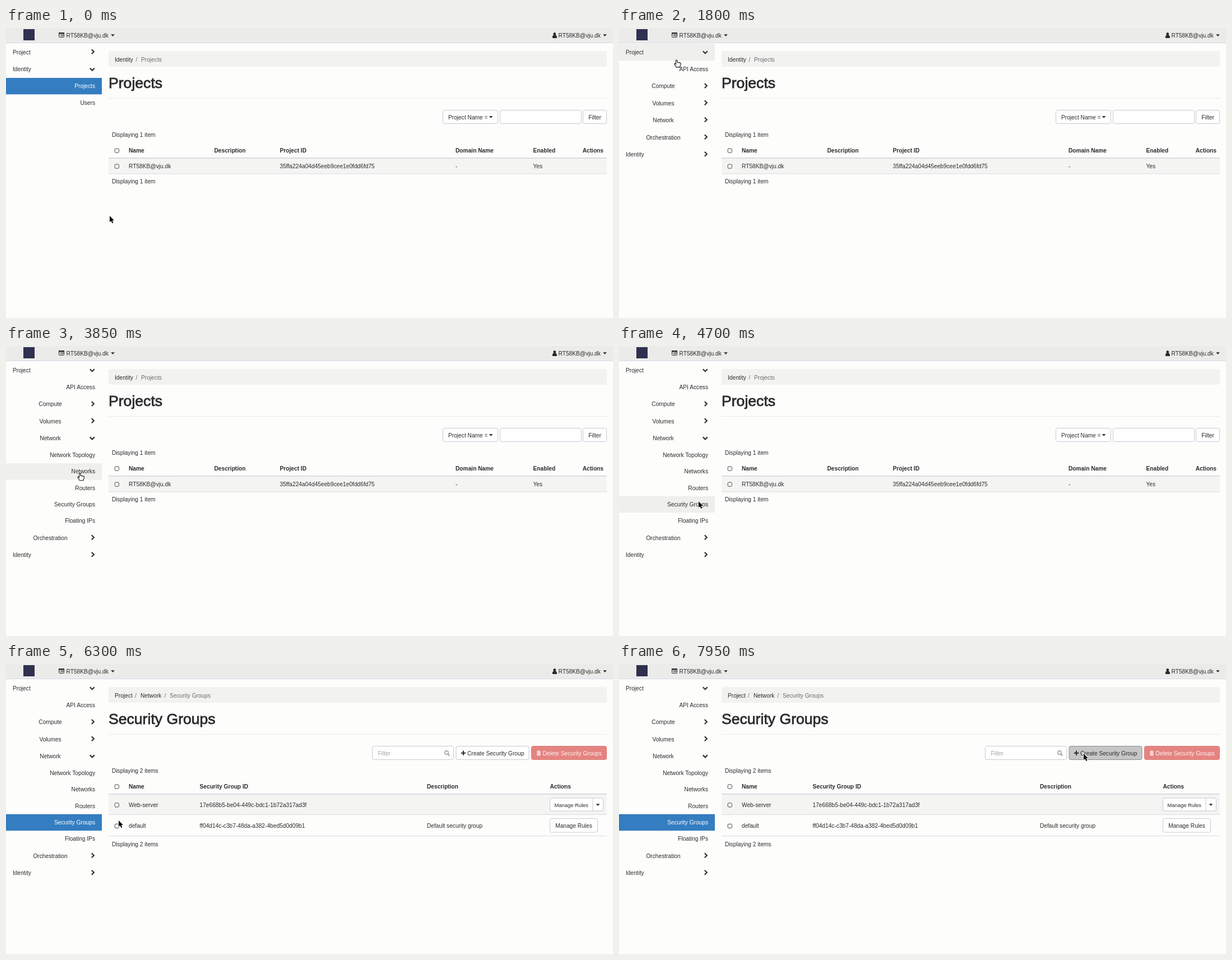
These frames come from a looping animation (1083 px wide and 517 px high, 8000 ms). An HTML page:

```html
<!DOCTYPE html>
<html lang="en">
<head>
<meta charset="utf-8">
<title>Security groups</title>
<style>
  html, body { margin: 0; width: 100%; height: 100%; overflow: hidden; background: #fdfdfc; }
  #stage { display: block; width: 1083px; height: 517px; }
  text { font: 10.2px "Liberation Sans", Arial, sans-serif; fill: #2b2b2b; white-space: pre; }
  .bold { font-weight: bold; }
  .title { font-size: 26.6px; stroke: #2b2b2b; stroke-width: .8px; }
  .loading { font-size: 13.8px; stroke: #2b2b2b; stroke-width: .5px; }
  .small { font-size: 9.4px; }
  .muted { fill: #6c6c6c; }
  .hint { fill: #a5a5a5; }
  .light { fill: #fdf3f3; }
</style>
</head>
<body>
<svg id="stage" viewBox="0 0 1083 517"></svg>
<script>
const LOOP = 8000, STEP = 50;
const OPEN_PROJECT = 1150, OPEN_NETWORK = 2600, CLICK_LINK = 4550;
const LOADING = 4900, NEW_PAGE = 5750, PRESS = 7850;
const SIDE = 171, ROW = 30.3, LINK = 29.4, ACCOUNT = 'RT58KB@vju.dk';
const INK = '#2b2b2b', BLUE = '#347dc0', BORDER = '#c9c8d3', STRIPE = '#f4f4f3';
const stage = document.getElementById('stage');

function add(parent, tag, attrs = {}) {
  const node = document.createElementNS('http://www.w3.org/2000/svg', tag);
  set(node, attrs);
  parent.append(node);
  return node;
}
function set(node, attrs) {
  for (const key in attrs) node.setAttribute(key, attrs[key]);
}
const group = parent => add(parent, 'g');
const show = (node, on) => set(node, { display: on ? 'inline' : 'none' });
const rect = (parent, x, y, width, height, fill, more = {}) =>
  add(parent, 'rect', { x, y, width, height, fill, ...more });
const path = (parent, d, more = {}) => add(parent, 'path', { d, fill: INK, ...more });

// Text is placed by the vertical middle of its capitals.
function label(parent, x, middle, content, cls = '', anchor = 'start', drop = 3.7) {
  const node = add(parent, 'text', { x, y: middle + drop, class: cls, 'text-anchor': anchor });
  node.textContent = content;
}
const box = (parent, x, y, w, h, fill = '#fff', stroke = BORDER) =>
  rect(parent, x + .5, y + .5, w - 1, h - 1, fill, { rx: 3, stroke });
const caret = (parent, x, y) => path(parent, `M${x} ${y}h6.6l-3.3 3.7z`);
const checkbox = (parent, y) =>
  rect(parent, 194.2, y - 3.5, 7.2, 7.2, '#fff', { rx: 1.8, stroke: '#444', 'stroke-width': 1 });
const rule = (parent, y, color = '#dddde2', h = 1) => rect(parent, 183, y, 889, h, color);

function chevron(parent, y) {
  const style = { fill: 'none', stroke: '#333', 'stroke-width': 2.2 };
  const right = path(parent, `M152.8 ${y - 4.7}l4 4l-4 4`, style);
  const down = path(parent, `M149.8 ${y - 1.8}l4 4l4 -4`, style);
  return open => { show(right, !open); show(down, open); };
}

function buildNavbar() {
  rect(stage, 0, 0, 1083, 26, '#ebebea');
  rect(stage, 0, 26, 1083, 1, '#d8d7e6');
  rect(stage, 31, 2, 20, 20, '#30304f');
  rect(stage, 94.5, 8.5, 9, 8, 'none', { rx: 1, stroke: INK });
  path(stage, 'M94 8h10v2.4h-10zM96 11.4h1.2v1h-1.2zM98 11.4h4.5v1H98zM96 13.6h1.2v1h-1.2zM98 13.6h4.5v1H98z');
  label(stage, 107.5, 13, ACCOUNT);
  caret(stage, 187.2, 11.2);
  path(stage, 'M978.8 8a2.5 2.8 0 0 1 1.5 5c2 .2 2.7 1.5 2.7 3.4q0 1.6-1.5 1.6h-5.2q-1.5 0-1.5-1.6c0-1.9.7-3.2 2.5-3.4a2.5 2.8 0 0 1 1.5-5z');
  label(stage, 985.5, 13, ACCOUNT);
  caret(stage, 1065.2, 11.2);
}

const rows = [];
function addRow(panel, middle, name, kind, height = ROW) {
  const holder = group(panel);
  const bg = rect(holder, 0, middle - height / 2, SIDE, height, '#efefed');
  const [x, anchor] = { top: [12, 'start'], mid: [79, 'middle'], leaf: [159, 'end'] }[kind];
  label(holder, x, middle, name, '', anchor);
  const row = { panel, holder, bg, middle, height, shift: 0, text: holder.lastChild };
  if (kind !== 'leaf') row.toggle = chevron(holder, middle);
  rows.push(row);
  return row;
}
const addPanel = parent => add(parent, 'svg', { x: 0, y: 0, width: SIDE, height: 0 });

function buildSidebar() {
  const root = addPanel(stage);
  set(root, { height: 517 });
  root.top = 0;
  root.size = 517;
  const projectPanel = addPanel(root), identityPanel = addPanel(root);
  const project = addRow(root, 43, 'Project', 'top');
  const identity = addRow(root, 73.4, 'Identity', 'top');

  addRow(projectPanel, 15.4, 'API Access', 'leaf');
  addRow(projectPanel, 45.7, 'Compute', 'mid').toggle(false);
  addRow(projectPanel, 75.9, 'Volumes', 'mid').toggle(false);
  const network = addRow(projectPanel, 106.2, 'Network', 'mid');
  const orchestration = addRow(projectPanel, 136.9, 'Orchestration', 'mid');
  orchestration.toggle(false);
  const networkPanel = addPanel(projectPanel);
  const links = ['Network Topology', 'Networks', 'Routers', 'Security Groups', 'Floating IPs']
    .map((name, i) => addRow(networkPanel, 14.8 + i * 29.3, name, 'leaf', LINK));
  const projects = addRow(identityPanel, 15, 'Projects', 'leaf', LINK);
  addRow(identityPanel, 44.5, 'Users', 'leaf', LINK);
  return { project, identity, network, orchestration, projects, security: links[3],
    projectPanel, identityPanel, networkPanel };
}

function place(panel, top, size, parentTop = 0) {
  panel.top = top;
  panel.size = size;
  set(panel, { y: top - parentTop, height: Math.max(size, .01) });
}
function shiftRow(row, by) {
  row.shift = by;
  set(row.holder, { transform: `translate(0 ${by})` });
}
function paintRow(row, active, hovered) {
  set(row.bg, { fill: active ? BLUE : '#efefed' });
  show(row.bg, active || hovered);
  row.text.style.fill = active ? '#fff' : INK;
}

function pageHeader(page, crumbs, title) {
  rect(page, 183, 41, 889, 28, '#f2f2f1', { rx: 3 });
  crumbs.forEach(([x, name], i) =>
    label(page, x, 56.3, name, name === '/' || i === crumbs.length - 1 ? 'muted' : ''));
  label(page, 183, 98.5, title, 'title', 'start', 8.5);
  rule(page, 125, '#e9e9ec');
}
function tableHeader(page, columns) {
  checkbox(page, 218.5);
  columns.forEach(([x, name, anchor]) => label(page, x, 218, name, 'bold', anchor));
}

function buildProjects() {
  const page = group(stage);
  pageHeader(page, [[194, 'Identity'], [231.5, '/'], [241, 'Projects']], 'Projects');
  box(page, 779, 146, 99, 25);
  label(page, 789, 158.8, 'Project Name =');
  caret(page, 861.8, 157);
  box(page, 881, 146, 146, 25);
  box(page, 1029, 146, 43, 25);
  label(page, 1050.5, 158.8, 'Filter', '', 'middle');
  label(page, 189, 190.5, 'Displaying 1 item');
  tableHeader(page, [[219, 'Name'], [371.5, 'Description'], [488.5, 'Project ID'],
    [802, 'Domain Name'], [940.5, 'Enabled'], [1066, 'Actions', 'end']]);
  rect(page, 183, 232, 889, 28, STRIPE);
  rule(page, 231, '#d5d5de', 1.5);
  rule(page, 259.5);
  checkbox(page, 246.5);
  [[219, ACCOUNT], [488.5, '35ffa224a04d45eeb9cee1e0fdd6fd75'], [802, '-'], [940.5, 'Yes']]
    .forEach(([x, name]) => label(page, x, 246.5, name));
  label(page, 189, 273.5, 'Displaying 1 item');
  return page;
}

function buildGroups() {
  const page = group(stage);
  pageHeader(page, [[194, 'Project'], [230, '/'], [240, 'Network'], [282.5, '/'],
    [292, 'Security Groups']], 'Security Groups');
  box(page, 653, 146, 146, 25);
  label(page, 663.5, 158.8, 'Filter', 'hint');
  add(page, 'circle', { cx: 786, cy: 158, r: 3.2, fill: 'none', stroke: '#999', 'stroke-width': 1.4 });
  path(page, 'M788.3 160.5l3 3', { stroke: '#999', 'stroke-width': 1.8 });
  page.create = box(page, 802.5, 146, 131, 25);
  path(page, 'M815 154.6h2v3.1h3.2v2H817v3.1h-2v-3.1h-3.1v-2h3.1z');
  label(page, 823, 158.8, 'Create Security Group');
  box(page, 937, 146, 135, 25, '#e48480', '#e07b77');
  path(page, 'M947 155.6h2v-1.2h3v1.2h2v1h-7zM947.6 157.3h5.8v6h-5.8z', { fill: '#fdf3f3' });
  path(page, 'M949.4 158.4v3.8M951.6 158.4v3.8', { stroke: '#e48480', 'stroke-width': .8 });
  label(page, 957.5, 158.8, 'Delete Security Groups', 'light');
  label(page, 189, 190.5, 'Displaying 2 items');
  tableHeader(page, [[219, 'Name'], [345.5, 'Security Group ID'], [751, 'Description'], [970.5, 'Actions']]);
  rect(page, 183, 232, 889, 36, STRIPE);
  rule(page, 231, '#d5d5de', 1.5);
  rule(page, 268);
  rule(page, 306);
  [[251, 'Web-server', '17e668b5-be04-449c-bdc1-1b72a317ad3f', ''],
   [288.5, 'default', 'ff04d14c-c3b7-48da-a382-4bed5d0d09b1', 'Default security group']]
    .forEach(([y, name, id, description]) => {
      checkbox(page, y + .3);
      label(page, 219, y, name);
      label(page, 345.5, y, id);
      label(page, 751, y, description);
    });
  box(page, 970, 238.5, 96, 24);
  rect(page, 1046.5, 239, 1, 23, BORDER);
  label(page, 1008.8, 250.8, 'Manage Rules', 'small', 'middle');
  caret(page, 1052.7, 249.3);
  box(page, 970, 275, 86, 25.5);
  label(page, 1013, 288.3, 'Manage Rules', '', 'middle');
  label(page, 189, 321, 'Displaying 2 items');
  return page;
}

function buildLoading() {
  const backdrop = rect(stage, 0, 0, 1083, 517, '#000');
  const dialog = group(stage);
  dialog.style.filter = 'drop-shadow(0 4px 6px rgba(0,0,0,.5))';
  rect(dialog, 485, 22.5, 115, 102.5, '#fdfdfc', { rx: 4, stroke: '#666', 'stroke-width': .6 });
  const spinner = group(dialog);
  for (let i = 0; i < 8; i++) {
    const angle = -i * Math.PI / 4;
    add(spinner, 'circle', { cx: 19.5 * Math.cos(angle), cy: 19.5 * Math.sin(angle),
      r: 3.4 + 2.8 * (1 - i / 7) ** 2, fill: INK });
  }
  label(dialog, 542.3, 106.5, 'Loading...', 'loading', 'middle', 4.7);
  return { backdrop, dialog, spinner };
}

function buildCursor() {
  const arrow = path(stage, 'M0 0v11l2.5-2.3l1.8 4.3l2-.9l-1.8-4.1h3.3z',
    { fill: '#000', stroke: '#fff', 'stroke-width': 1.4, 'paint-order': 'stroke', 'stroke-linejoin': 'round' });
  const hand = path(stage,
    'M-1.3 .8Q0-.8 1.2.8V4.3q1.3-.7 2.2.4q1.3-.6 2 .5q1.9-.4 2.1 1.2q.1 3-1.4 4.7v1.7h-6.8q-.5-2-3-5.2q-.7-1.3.6-1.4q1 .2 1.8 1.3z',
    { fill: '#fff', stroke: '#111', 'stroke-width': 1.1, 'stroke-linejoin': 'round' });
  return { arrow, hand };
}

buildNavbar();
const side = buildSidebar();
const projectsPage = buildProjects();
const groupsPage = buildGroups();
const loading = buildLoading();
const cursor = buildCursor();

// time, x, y of the pointer tip
const POINTER = [[0, 185, 335], [250, 185, 335], [1000, 101, 46], [1640, 101, 46],
  [2460, 118, 157], [3350, 118, 157], [4250, 142, 277], [5900, 142, 277],
  [6250, 201, 279], [6500, 201, 279], [7650, 829, 160], [LOOP, 829, 160]];

const clamp = u => Math.min(1, Math.max(0, u));
const smooth = u => u * u * (3 - 2 * u);
const progress = (t, start, length) => clamp((t - start) / length);
const slide = (t, start) => 1 - (1 - progress(t, start, 350)) ** 2.2;

function pointerAt(t) {
  const i = POINTER.findIndex(key => key[0] > t);
  const [t0, x0, y0] = POINTER[i - 1], [t1, x1, y1] = POINTER[i];
  const u = smooth((t - t0) / (t1 - t0));
  return [x0 + (x1 - x0) * u, y0 + (y1 - y0) * u];
}

function drawSidebar(t, x, y) {
  const opening = slide(t, OPEN_PROJECT);
  const networkSize = 147 * slide(t, OPEN_NETWORK);
  const projectSize = (152 + networkSize) * opening;
  place(side.projectPanel, 58, projectSize);
  place(side.networkPanel, 179.7, networkSize, 58);
  place(side.identityPanel, 88.6 + projectSize, 60 * (1 - opening));
  shiftRow(side.identity, projectSize);
  shiftRow(side.orchestration, networkSize);
  side.project.toggle(t >= OPEN_PROJECT);
  side.identity.toggle(t < OPEN_PROJECT);
  side.network.toggle(t >= OPEN_NETWORK);

  const active = t < NEW_PAGE ? side.projects : side.security;
  let found = false;
  for (const row of rows) {
    const middle = row.panel.top + row.middle + row.shift;
    const visible = y < row.panel.top + row.panel.size;
    const hovered = !found && visible && x < SIDE && Math.abs(y - middle) <= row.height / 2;
    found = found || hovered;
    paintRow(row, row === active, hovered);
  }
  return found;
}

function draw(t) {
  const [x, y] = pointerAt(t);
  const overRow = drawSidebar(t, x, y);
  show(projectsPage, t < NEW_PAGE);
  show(groupsPage, t >= NEW_PAGE);

  const overCreate = x > 803 && x < 933 && y > 146 && y < 171;
  set(groupsPage.create, {
    fill: t >= PRESS ? '#c6c6c6' : overCreate ? '#e6e6e6' : '#fff',
    stroke: t >= PRESS ? '#8c8c8c' : overCreate ? '#adadad' : BORDER
  });

  const busy = t >= LOADING && t < NEW_PAGE;
  const fade = progress(t, LOADING, 150), drop = progress(t, LOADING, 300);
  show(loading.backdrop, busy);
  show(loading.dialog, busy);
  set(loading.backdrop, { opacity: .52 * fade });
  set(loading.dialog, { opacity: fade, transform: `translate(0 ${-26 * (1 - drop) ** 2})` });
  set(loading.spinner, { transform: `translate(542 59.4) rotate(${73 + (t - 5400) * .18})` });

  const pointing = overRow && t < CLICK_LINK;
  show(cursor.hand, pointing);
  show(cursor.arrow, !pointing);
  for (const shape of [cursor.hand, cursor.arrow]) set(shape, { transform: `translate(${x} ${y})` });
}

const start = performance.now();
function tick() {
  const elapsed = (performance.now() - start) % LOOP;
  draw(Math.floor(elapsed / STEP) * STEP);
  requestAnimationFrame(tick);
}
tick();
</script>
</body>
</html>
```
